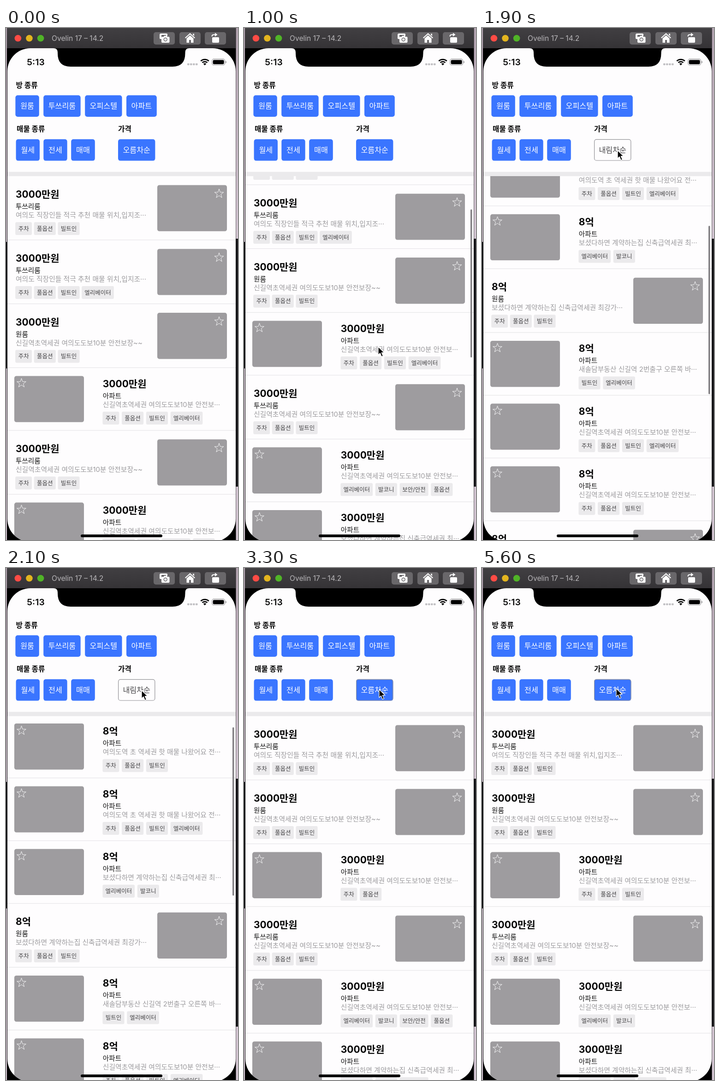
Write an HTML page that moves like this. It is 503 px wide and 1113 px high and loops after 5.7 s.

```html
<!DOCTYPE html>
<html lang="ko">
<head>
<meta charset="utf-8">
<style>
  html, body { margin: 0; width: 100%; height: 100%; overflow: hidden; background: #000; }
  svg { display: block; width: 503px; height: 1113px; }
  text { font-family: Inter, 'Noto Sans CJK KR', 'Noto Sans CJK JP', 'Noto Sans CJK', sans-serif; white-space: pre; }
</style>
</head>
<body>
<svg id="stage" viewBox="0 0 503 1113" xmlns="http://www.w3.org/2000/svg"></svg>
<script>
const LOOP = 5700, STEP = 100;
const LIST_TOP = 322, ROW_A = 136.4, ROW_B = 138.8;

const rect = (x, y, w, h, fill, r = 0, extra = '') =>
  `<rect x="${x}" y="${y}" width="${w}" height="${h}" rx="${r}" fill="${fill}" ${extra}/>`;

// y is the vertical middle of the line
const label = (str, x, y, size, fill, weight = 400, anchor = 'start') =>
  `<text x="${x}" y="${y + size * 0.37}" font-size="${size}" fill="${fill}" font-weight="${weight}" text-anchor="${anchor}">${str}</text>`;

function star(cx, cy) {
  const pts = [];
  for (let i = 0; i < 10; i++) {
    const r = i % 2 ? 4.1 : 10.4, a = i * Math.PI / 5;
    pts.push((cx + r * Math.sin(a)).toFixed(2) + ',' + (cy + 0.8 - r * Math.cos(a)).toFixed(2));
  }
  return `<polygon points="${pts.join(' ')}" fill="none" stroke="#f4f4f5" stroke-width="1"/>`;
}

const TAGS = ['주차', '풀옵션', '빌트인', '엘리베이터', '발코니', '보안/안전'];
const FLAT = '아파트', ONE = '원룸', TWO = '투쓰리룸';
const JOB = '여의도 직장인들 적극 추천 매물 위치,입지조···';
const WALK = '신길역초역세권 여의도도보10분 안전보장~~';
const WALK_CUT = '신길역초역세권 여의도도보10분 안전보···';
const NEW = '보셨다하면 계약하는집 신축급역세권 최강가···';
const NEW_CUT = '보셨다하면 계약하는집 신축급역세권 최···';
const HOT = '여의도역 초 역세권 핫 매물 나왔어요 전···';
const EXIT = '새솔담부동산 신길역 2번출구 오른쪽 바···';

const cheap = (third, fifth) => [
  [TWO, JOB, '012'], [ONE, WALK, '012'], [FLAT, WALK_CUT, third],
  [TWO, WALK, '012'], [FLAT, WALK_CUT, fifth], [FLAT, NEW_CUT, '345']
];
const costly = (second, third, sixth) => [
  [FLAT, HOT, '012'], [FLAT, HOT, second], [FLAT, NEW_CUT, third],
  [ONE, NEW, '012'], [FLAT, EXIT, '23'], [FLAT, WALK_CUT, sixth],
  [FLAT, WALK_CUT, '012'], [ONE, WALK, '012']
];
const LOW = '3000만원', HIGH = '8억';
const lists = [
  [LOW, [[TWO, JOB, '012'], [TWO, JOB, '0123'], [ONE, WALK, '012'], [FLAT, WALK_CUT, '0123'],
         [TWO, WALK, '012'], [FLAT, WALK_CUT, '3451'], [FLAT, NEW_CUT, '345'], [TWO, JOB, '012']]],
  [HIGH, costly('0123', '34', '0123')],
  [LOW, cheap('01', '3451')],
  [HIGH, costly('01', '345', '01')],
  [LOW, cheap('012', '34')]
];

function row(price, [room, desc, tags], top) {
  const flat = room === FLAT;
  const x = flat ? 209.8 : 21, dy = flat ? 0 : 4.5;
  const picX = flat ? 18 : 328, picY = top + (flat ? 18 : 19.5);
  let out = rect(picX, picY, 151, 100.3, '#9e9c9f', 4.5)
    + star(flat ? 33.5 : 462, top + (flat ? 32.8 : 37.5))
    + label(price, x, top + 34.7 + dy, 21, '#050505', 700)
    + label(room, x, top + 61 + dy, 14.6, '#111', 400)
    + label(desc, x, top + 80 + dy, 14.8, '#9c9b9e');
  let tx = x - (flat ? 0.4 : 0.8);
  for (const i of tags) {
    const name = TAGS[i];
    const w = 13.4 + 11.25 * (name.includes('/') ? 4.32 : name.length);
    out += rect(tx, top + 95.6 + dy, w, 28, '#ebeaec', 3)
      + label(name, tx + w / 2, top + 109.6 + dy, 12.5, '#444345', 400, 'middle');
    tx += w + (flat ? 5.7 : 4.6);
  }
  const h = flat ? ROW_A : ROW_B;
  return [out + rect(3, top + h - 0.6, 495, 1.1, '#e4e3e6'), h];
}

function listMarkup([price, rows], i) {
  let top = LIST_TOP, out = '';
  for (const r of rows) {
    const [markup, h] = row(price, r, top);
    out += markup;
    top += h;
  }
  return `<g id="list${i}">${out}</g>`;
}

const pill = (str, x, y, w) =>
  rect(x, y, w, 46.8, '#3a75ff', 5) + label(str, x + w / 2, y + 23.1, 16.2, '#fff', 400, 'middle');

function toolbar() {
  const lights = ['#fe4b45', '#e3b51f', '#50b427'].map((c, i) =>
    `<circle cx="${25.9 + i * 24.6}" cy="22.3" r="7.3" fill="${c}"/>`).join('');
  const keys = [320, 376, 431].map(x => rect(x, 9, 46, 27, '#69676a', 5)).join('');
  return rect(2, 0, 496, 44, 'url(#bar)') + lights
    + label('Ovelin 17 – 14.2', 99, 22.5, 15.6, '#b9b7ba') + keys
    + `<g fill="#fff">
      <path d="M336 12h12a2 2 0 0 1 2 2v3h-3v-2h-10v9h-2a2 2 0 0 1-2-2v-7a3 3 0 0 1 3-3z"/>
      <path d="M339 19h3l1.5-2.2h5L350 19h2.5a2 2 0 0 1 2 2v9a2 2 0 0 1-2 2H339a2 2 0 0 1-2-2v-9a2 2 0 0 1 2-2z"/>
      <path d="M399 11l11 10-1.5 1.6L399 14l-9.5 8.6L388 21zM405 12.5h3v5l-3-2.7z"/>
      <path d="M399 16l7.5 6.8V32H401v-6h-4v6h-5.5v-9.2z"/>
      <path d="M449 20h11a2 2 0 0 1 2 2v8a2 2 0 0 1-2 2h-11a2 2 0 0 1-2-2v-8a2 2 0 0 1 2-2z"/>
      <path d="M453 10.500v8l5.500-4z"/></g>
      <circle cx="345.7" cy="25" r="3.4" fill="none" stroke="#69676a" stroke-width="1.5"/>
      <path d="M454 14.5h-3.5q-4 0-4 4" fill="none" stroke="#fff" stroke-width="2"/>`;
}

function statusBar() {
  const dots = [0, 1, 2, 3].map(i => rect(393 + i * 6, 76.7, 4.6, 4.2, '#c2c1c4', 1.3)).join('');
  return label('5:13', 64.5, 74.3, 19.3, '#0a0a0a', 600, 'middle') + dots
    + `<g fill="none" stroke="#000" stroke-width="2.8">
      <path d="M422.3 71.8a12.5 12.5 0 0 1 17.4 0"/>
      <path d="M425.6 75.3a7.8 7.8 0 0 1 10.8 0"/></g>
      <path d="M427.8 77.7a4.6 4.6 0 0 1 6.4 0L431 81.2z"/>`
    + rect(446.6, 67.4, 28, 13.4, 'none', 4, 'stroke="#9b9a9d" stroke-width="1.1"')
    + rect(448.6, 69.4, 24, 9.4, '#000', 2.4)
    + '<path d="M476 71.5q2 .6 2 2.6t-2 2.6z" fill="#9b9a9d"/>';
}

const desk = (x, w, a, b) => rect(x, 0, w, 1113, 'url(#desk)')
  + rect(x, a, w, b - a, '#19191c');

const stage = document.getElementById('stage');
stage.innerHTML = `
  <defs>
    <linearGradient id="bar" x2="0" y2="1">
      <stop offset="0" stop-color="#413f42"/><stop offset="1" stop-color="#353336"/>
    </linearGradient>
    <linearGradient id="desk" x2="0" y2="1">
      <stop offset="0" stop-color="#b3a4b1"/><stop offset=".4" stop-color="#d3c5d2"/>
    </linearGradient>
    <clipPath id="screen">${rect(3, 44, 495, 1073, '#fff', 50)}</clipPath>
    <clipPath id="table">${rect(3, LIST_TOP, 495, 800, '#fff')}</clipPath>
  </defs>`
  + desk(0, 3, 465, 740) + desk(498, 5, 458, 997)
  + rect(2, 0, 496.5, 1113, '#000') + toolbar()
  + '<g clip-path="url(#screen)">' + rect(3, 44, 495, 1073, '#fefdfe')
  + '<path d="M103 44q9 0 9 9v2q0 29 28 29h221q27.500 0 27.500-29v-2q0-9 9-9z"/>'
  + statusBar()
  + label('방 종류', 21.5, 124, 15.8, '#0a0a0a', 700)
  + label('매물 종류', 23, 219.5, 15.7, '#0a0a0a', 700)
  + label('가격', 243, 219.5, 15.7, '#0a0a0a', 700)
  + pill('원룸', 20.4, 146.2, 51.4) + pill(TWO, 81.2, 146.2, 80.5)
  + pill('오피스텔', 171.2, 146.2, 80.3) + pill(FLAT, 261, 146.2, 65.8)
  + pill('월세', 21.6, 241.8, 51.4) + pill('전세', 81.3, 241.8, 51.4) + pill('매매', 141.2, 241.8, 51.6)
  + '<g id="sort">' + pill('오름차순', 243, 241.8, 80.4)
  + rect(243.6, 242.4, 79.2, 45.6, 'none', 4.5, 'id="edge" stroke="#939297" stroke-width="1.2"') + '</g>'
  + rect(3, 312.7, 495, 9.3, '#ebeaec')
  + '<g clip-path="url(#table)"><g id="lists">' + lists.map(listMarkup).join('') + '</g>'
  + rect(491, 430, 3.5, 322, '#828083', 1.7, 'id="bead"') + '</g>'
  + rect(162, 1101, 177, 6, '#000', 3) + '</g>'
  + `<path id="cursor" d="M0 0V17.6L4.1 13.8L7.2 21.3L10.4 20L7.3 12.7H13z"
      fill="#000" stroke="#fff" stroke-width="1.2" stroke-linejoin="round"/>`;

const $ = id => document.getElementById(id);
const sortBox = $('sort').querySelector('rect'), sortText = $('sort').querySelector('text');
const listNodes = lists.map((_, i) => $('list' + i));

// [time, x, y]
const mouse = [
  [300, 505, 856], [600, 285, 806], [700, 279, 799], [800, 279, 799], [1100, 297, 640], [1200, 298, 635],
  [1300, 297, 610], [1500, 295, 420], [1700, 294, 280], [1800, 294, 266],
  [2400, 294, 266], [2800, 293, 264], [5400, 293, 264], [5600, 291, 262]
];
// [time, offset]
const scroll = [[800, 0], [900, 45], [1000, 120], [1100, 185], [1200, 208], [1900, 208], [2000, 60], [2100, 2], [2200, 0]];
const toggles = [1900, 2800, 3900, 5100];

function at(track, t) {
  if (t <= track[0][0]) return track[0].slice(1);
  for (let i = 1; i < track.length; i++) {
    const a = track[i - 1], b = track[i];
    if (t <= b[0]) {
      const k = (t - a[0]) / (b[0] - a[0]);
      return a.slice(1).map((v, j) => v + (b[j + 1] - v) * k);
    }
  }
  return track[track.length - 1].slice(1);
}

function draw(t) {
  const state = toggles.filter(m => t >= m).length;
  const down = state % 2 === 1;
  listNodes.forEach((n, i) => n.setAttribute('display', i === state ? 'inline' : 'none'));

  sortBox.setAttribute('fill', down ? '#fefdfe' : '#3a75ff');
  $('edge').setAttribute('opacity', state ? 1 : 0);
  sortText.setAttribute('fill', down ? '#49484b' : '#fff');
  sortText.textContent = down ? '내림차순' : '오름차순';

  const [offset] = at(scroll, t);
  $('lists').setAttribute('transform', `translate(0 ${-offset})`);
  const bead = $('bead');
  bead.setAttribute('y', 345.5 + offset * 0.406);
  bead.setAttribute('height', down ? 366 : 322);
  bead.setAttribute('opacity', t <= 800 ? 0 : Math.max(0, Math.min(1, (2700 - t) / 300)));

  const [x, y] = at(mouse, t);
  $('cursor').setAttribute('transform', `translate(${x} ${y})`);
}

const start = performance.now();
function tick() {
  const t = (performance.now() - start) % LOOP;
  draw(Math.floor(t / STEP) * STEP);
  requestAnimationFrame(tick);
}
draw(0);
tick();
</script>
</body>
</html>
```
